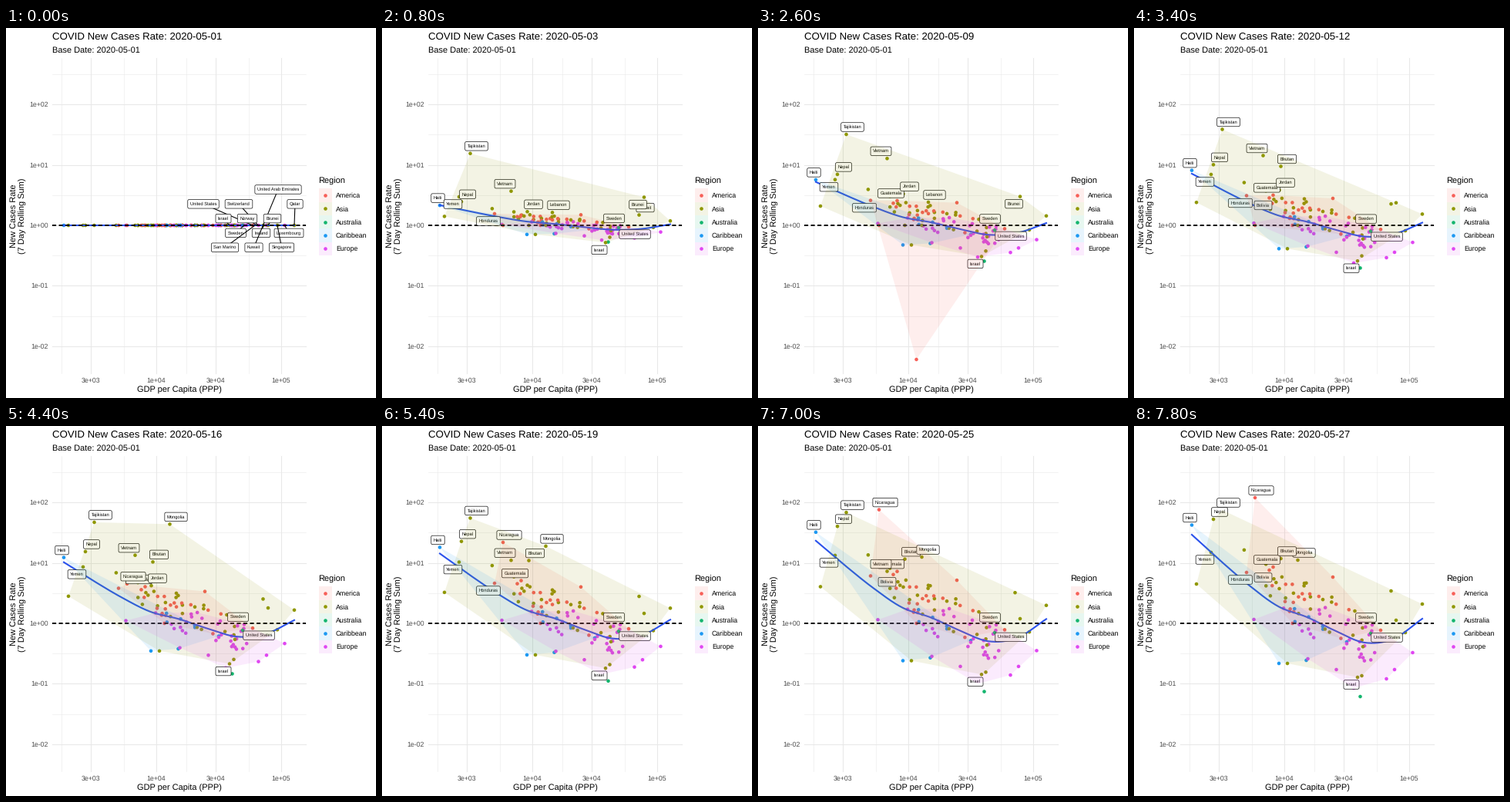
A matplotlib script for the animation above (8 s loop, 480 px wide and 480 px high).

```python
import numpy as np
import matplotlib.pyplot as plt
from matplotlib.animation import FuncAnimation

plt.rcParams.update({"font.family": "Liberation Sans", "text.hinting": "none"})

SIZE, FRAMES, STEP = 480, 40, 200
DAYS_PER_FRAME = 68 / 99
LEFT, RIGHT, TOP, BOTTOM = 60, 388.5, 39, 448
BASE, ONE_K10, DECADE_X, DECADE_Y = 256, 195, 162, 78.4
GREY = "#4D4D4D"

COLORS = {"America": "#F75F58", "Asia": "#8F9700", "Australia": "#14B56E",
          "Caribbean": "#1C98F2", "Europe": "#E046F2"}

# Labelled countries: region, label corner, x, final rise, [power, start, fade].
COUNTRIES = {
    "Tajikistan": ("Asia", "ne", 114.5, 147, 0.2),
    "Nepal": ("Asia", "ne", 103, 135),
    "Yemen": ("Asia", "sw", 100, 92, 0.4),
    "Vietnam": ("Asia", "nw", 167.5, 60, 1, 0, 2.2),
    "Jordan": ("Asia", "ne", 188.5, 45, 1, 0, 1.5),
    "Bhutan": ("Asia", "ne", 190.5, 84, 0.05, 13),
    "Mongolia": ("Asia", "ne", 212.5, 82, -0.2, 20),
    "Lebanon": ("Asia", "ne", 221, 52, 0.5),
    "Kuwait": ("Asia", "ne", 333.5, 42, 0.5),
    "Brunei": ("Asia", "sw", 340, 4, 1, 0, 5),
    "Israel": ("Asia", "sw", 290, -70, 0.5),
    "Haiti": ("Caribbean", "nw", 75, 127.5, 0.7),
    "Honduras": ("America", "sw", 146, 66),
    "Nicaragua": ("America", "ne", 157, 163, 0.4, 21),
    "Guatemala": ("America", "nw", 180.5, 73, 0.75),
    "Bolivia": ("America", "sw", 175.5, 69, 0.8),
    "United States": ("America", "se", 320, -9),
    "Sweden": ("Europe", "nw", 309, -2),
}
ALWAYS = ("Sweden", "United States", "Israel")

# Unlabelled extremes that shape each region's hull: x and final rise.
EXTREMES = {
    "America": {258: 60},
    "Asia": {81: 51, 199: -52, 295.5: -68, 352: -12, 374: 25},
    "Australia": {293.5: -95, 307: -13},
    "Caribbean": {188: -52, 223.5: -48, 276: -24},
    "Europe": {155.5: 5, 225.5: -46, 262.5: -60, 285: -84, 327.5: -72,
               338: -60, 361.5: -38},
}

# Everyone else scatters about the trend: count, x low, mode, high, bias, spread.
CROWD = {"America": (16, 176, 205, 305, 14, 24), "Asia": (24, 125, 200, 336, 18, 28),
         "Caribbean": (5, 190, 240, 276, -10, 20), "Europe": (28, 183, 305, 325, 0, 24)}

# Opening labels in rows from the top: name, label x, point x.
OPENING = [
    [("United Arab Emirates", 353, 333.5)],
    [("United States", 256, 320), ("Switzerland", 302, 327), ("Qatar", 375, 374)],
    [("Israel", 282, 290), ("Norway", 313, 325), ("Brunei", 345.5, 340)],
    [("Sweden", 298, 309), ("Ireland", 331, 334), ("Luxembourg", 367, 361.5)],
    [("San Marino", 284, 323), ("Kuwait", 321.5, 333.5), ("Singapore", 357.5, 352)],
]

KNOTS = np.linspace(75, 374, 9)
TREND = np.array([115, 81, 49, 22, 8, -10, -25, -20, 6])


def lift(i, rise, power=0.65, start=0, fade=0):
    """Height above the base line: a power curve, optionally late or fading."""
    s = (i - start) / (FRAMES - 1 - start)
    return rise * s ** power * np.exp(fade * (1 - s)) if s > 0 else 0


def smooth(ys):
    """Cubic Hermite curve through the trend knots."""
    slope = np.gradient(ys)
    u = np.linspace(0, len(ys) - 1, 200)
    k = np.minimum(u.astype(int), len(ys) - 2)
    t = u - k
    y = ((1 + 2 * t) * (1 - t) ** 2 * ys[k] + t * (1 - t) ** 2 * slope[k]
         + t * t * (3 - 2 * t) * ys[k + 1] + t * t * (t - 1) * slope[k + 1])
    return np.interp(u, range(len(ys)), KNOTS), y


def make_points():
    """All points as (region, x, arguments of lift)."""
    rng = np.random.default_rng(12)
    pts = [(region, x, args) for region, _, x, *args in COUNTRIES.values()]
    for region, group in EXTREMES.items():
        pts += [(region, x, (rise,)) for x, rise in group.items()]
    for region, (count, low, mode, high, bias, spread) in CROWD.items():
        for x in rng.triangular(low, mode, high, count):
            rise = np.interp(x, KNOTS, TREND) + bias + rng.uniform(-spread, spread)
            pts.append((region, x, (rise,)))
    return [pts[n] for n in rng.permutation(len(pts))]


def hull(pts):
    def chain(seq):
        out = []
        for x, y in seq:
            while len(out) > 1:
                (x0, y0), (x1, y1) = out[-2:]
                if (x1 - x0) * (y - y0) > (y1 - y0) * (x - x0):
                    break
                out.pop()
            out.append((x, y))
        return out[:-1]
    pts = sorted(set(pts))
    return chain(pts) + chain(pts[::-1])


fig = plt.figure(figsize=(SIZE / 72, SIZE / 72), dpi=72, facecolor="white")
ax = fig.add_axes([0, 0, 1, 1])
ax.set_xlim(0, SIZE)
ax.set_ylim(SIZE, 0)
ax.axis("off")


def text(x, y, s, size, color="black", **kw):
    return ax.text(x, y, s, fontsize=size, color=color, **kw)


def rule(xs, ys, width):
    ax.plot(xs, ys, color="#E8E8E8", lw=width, zorder=0)


def draw_backdrop():
    for k in range(4):
        x = 71.5 + DECADE_X / 2 * k
        rule((x, x), (TOP, BOTTOM), 0.55)
    for k in range(5):
        y = BASE + DECADE_Y * (k - 2.5)
        rule((LEFT, RIGHT), (y, y), 0.55)
    for value in (3e3, 1e4, 3e4, 1e5):
        x = ONE_K10 + DECADE_X * np.log10(value / 1e4)
        rule((x, x), (TOP, BOTTOM), 1.07)
        text(x, 460, f"{value:.0e}", 8.8, GREY, ha="center")
    for k in range(-2, 3):
        y = BASE - DECADE_Y * k
        rule((LEFT, RIGHT), (y, y), 1.07)
        text(55, y + 3, f"{10.0 ** k:.0e}", 8.8, GREY, ha="right")
    ax.plot((LEFT, RIGHT), (BASE, BASE), color="black", lw=1.9, zorder=4,
            dashes=(2.7, 1.8), dash_capstyle="butt")

    text(224.5, 472.5, "GDP per Capita (PPP)", 11, ha="center")
    for x, s in ((10.5, "New Cases Rate"), (21.5, "(7 Day Rolling Sum)")):
        text(x, 243.5, s, 11, ha="center", va="center", rotation=90)
    text(60, 32, "Base Date: 2020-05-01", 11)
    text(405, 202, "Region", 11)
    for k, (name, color) in enumerate(COLORS.items()):
        y = 217 + 17.3 * k
        ax.add_patch(plt.Rectangle((405.5, y - 8.6), 17.3, 17.3, fc=color, alpha=0.1, lw=0))
        ax.scatter(414, y, s=21, c=color, lw=0)
        text(428, y + 3.2, name, 8.8)


def labels_at(i):
    """Yield name, label centre and optional point to lead to."""
    if i < 2:
        for r, row in enumerate(OPENING):
            for name, x, px in row[::-1]:
                yield name, x, 209.5 + 18.8 * r, px
        return
    rise = {name: lift(i, *c[3:]) for name, c in COUNTRIES.items()}
    top = sorted(rise, key=rise.get)[-10:]
    for name in dict.fromkeys((*top, *ALWAYS)):
        _, corner, x, *_ = COUNTRIES[name]
        x += 8 if corner[1] == "e" else -8
        dy = 9.5 if corner[0] == "s" else -9.5
        yield name, max(x, LEFT + 12.5), BASE - rise[name] + dy, None


draw_backdrop()
POINTS = make_points()
title = text(60, 15, "", 13.2)
trend, = ax.plot([], [], color="#2A52EC", lw=2.1, zorder=3)
dots = ax.scatter([0] * (len(POINTS) + 1), [0] * (len(POINTS) + 1), s=21, lw=0, zorder=2,
                  c=[COLORS[p[0]] for p in POINTS] + [COLORS["America"]])
areas = {r: ax.fill([0, 0, 0], [0, 0, 0], fc=c, alpha=0.105, lw=0, zorder=30)[0]
         for r, c in COLORS.items() if r != "Australia"}
tags = []


def update(i):
    title.set_text(f"COVID New Cases Rate: 2020-05-{1 + int(i * DAYS_PER_FRAME):02d}")
    spots = [(r, (x, BASE - lift(i, *args))) for r, x, args in POINTS]
    # one country plunges for a day
    spots.append(("America", (205.5, BASE + 174 * max(0, 1 - abs(i - 13) / 1.5))))
    dots.set_offsets([xy for _, xy in spots])
    for region, area in areas.items():
        area.set_visible(i > 0)
        if i > 0:
            area.set_xy(hull([xy for r, xy in spots if r == region]))
    trend.set_data(*smooth(BASE - lift(i, 1) * TREND))

    while tags:
        tags.pop().remove()
    for n, (name, x, y, px) in enumerate(labels_at(i)):
        z = 5 + n
        if px is not None:
            tags.extend(ax.plot((x, px), (y, BASE), color="black", lw=1.07, zorder=z))
        tags.append(text(x, y, name, 5.69, ha="center", va="center", zorder=z + 0.5,
                         bbox=dict(boxstyle="round,pad=0.52,rounding_size=0.32",
                                   fc="white", ec="black", lw=0.65)))
    return []


anim = FuncAnimation(fig, update, frames=FRAMES, interval=STEP, init_func=lambda: [],
                     repeat=True, repeat_delay=0, blit=False)
plt.show()
```
